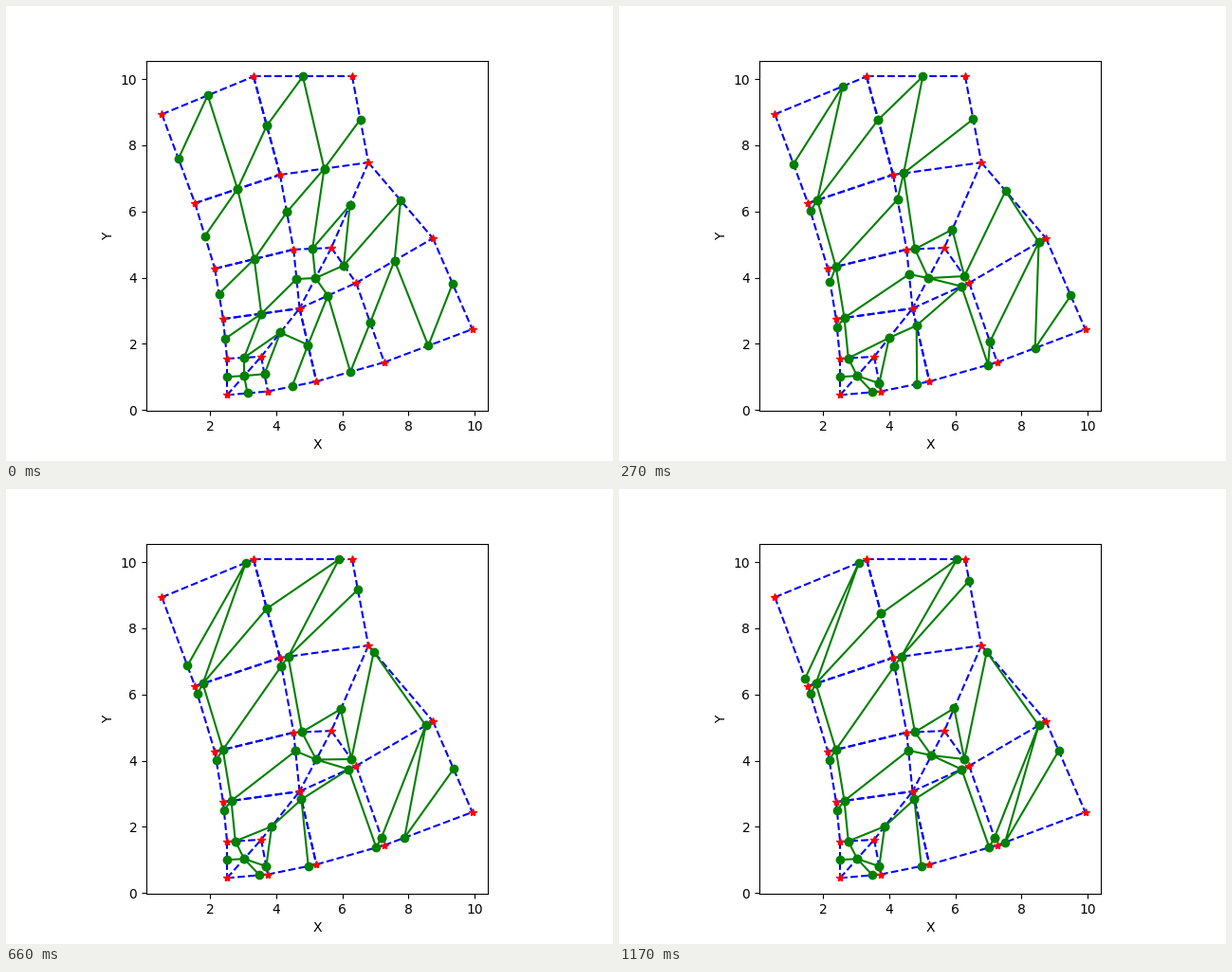
These frames come from a looping animation (640x480 px, 1800 ms). A matplotlib script:

```python
import numpy as np
import matplotlib.pyplot as plt
from matplotlib.animation import FuncAnimation

STEP_MS = 30
FRAMES = 60
MARGIN = 0.25  # closest a slider may get to a mesh vertex

NODES = {
    "A": (2.52, 0.45), "B": (3.75, 0.56), "C": (5.22, 0.86), "D": (7.27, 1.44),
    "E": (9.93, 2.44), "F": (2.52, 1.55), "G": (3.55, 1.61), "H": (2.40, 2.75),
    "I": (4.71, 3.07), "J": (6.42, 3.84), "K": (8.74, 5.19), "L": (2.15, 4.27),
    "M": (4.53, 4.85), "N": (5.67, 4.90), "O": (1.55, 6.25), "P": (4.12, 7.11),
    "Q": (6.79, 7.48), "R": (0.55, 8.94), "S": (3.32, 10.08), "T": (6.30, 10.08),
}
NODES = {name: np.array(xy) for name, xy in NODES.items()}

# Slider position along each edge at the key steps; the last value holds.
KEYS = [0, 4, 9, 16, 22, 32, 39]
SLIDES = {
    "RO": [.51, .56, .64, .77, 1],
    "RS": [.63, .74, .825, 1],
    "OP": [.29, .11, 0],
    "SP": [.5, .44, .44, .5, .57, .55],
    "ST": [.49, .57, .69, .865, 1],
    "TQ": [.525, .495, .43, .35, .28, .245],
    "PQ": [.18, .12, 0],
    "OL": [.5, 0],
    "LM": [.39, 0],
    "PM": [.63, .33, 0],
    "MN": [0],
    "QN": [.715, .785, .735, .745, .745, .735],
    "LH": [.55, .265, 0],
    "HI": [0],
    "MI": [.55, .42, .355, .315, .305],
    "NI": [.5, .5, .485, .475, .45, .405],
    "NJ": [1],
    "IJ": [1],
    "QK": [.485, .375, .185, 0],
    "JK": [1],
    "KE": [.585, .63, .6, .525, .43, .325],
    "DE": [.49, .43, .36, .23, 0],
    "JD": [.56, .74, 1],
    "CD": [.515, .865, 1],
    "IC": [.385, .235, 0],
    "BC": [.45, .745, 1],
    "GI": [.2, .39, .265, .275],
    "GB": [1],
    "FG": [0],
    "HF": [.57, 0],
    "FA": [.5],
    "AG": [.5],
    "AB": [.44, 1],
}

# One green chain per mesh cell
CHAINS = [chain.split() for chain in (
    "RO RS OP SP", "SP ST PQ TQ", "OL OP LM PM", "PM PQ MN QN",
    "LH LM HI MI", "MI NI MN", "NJ NI IJ", "QN NJ QK JK",
    "JD JK DE KE", "IC IJ CD JD", "HF HI FG GI", "GB GI IC BC",
    "FG AG FA", "AB AG GB",
)]
DOUBLED = ["SP", "OP", "LM", "HI", "IC"]


def slider(edge, step):
    start, end = (NODES[name] for name in edge)
    values = [.5] + SLIDES[edge]
    t = np.interp(step, KEYS[:len(values)], values)
    gap = MARGIN / np.hypot(*(end - start))
    return start + np.clip(t, gap, 1 - gap) * (end - start)


fig, ax = plt.subplots(figsize=(6.4, 4.8), dpi=100)
ax.set_aspect("equal", adjustable="box")
ax.set_xlim(0.081, 10.399)
ax.set_ylim(-0.0315, 10.5615)
ax.set_xticks(range(2, 11, 2))
ax.set_yticks(range(0, 11, 2))
ax.set_xlabel("X")
ax.set_ylabel("Y")

for edge in list(SLIDES) + DOUBLED:
    ax.plot(*zip(*(NODES[name] for name in edge)), "b--")
ax.plot(*zip(*NODES.values()), "r*")
lines = [ax.plot([], [], "go-")[0] for _ in CHAINS]


def update(step):
    points = {edge: slider(edge, step) for edge in SLIDES}
    for line, chain in zip(lines, CHAINS):
        line.set_data(*zip(*(points[edge] for edge in chain)))
    return lines


anim = FuncAnimation(fig, update, frames=FRAMES, interval=STEP_MS, repeat=True)
plt.show()
```
